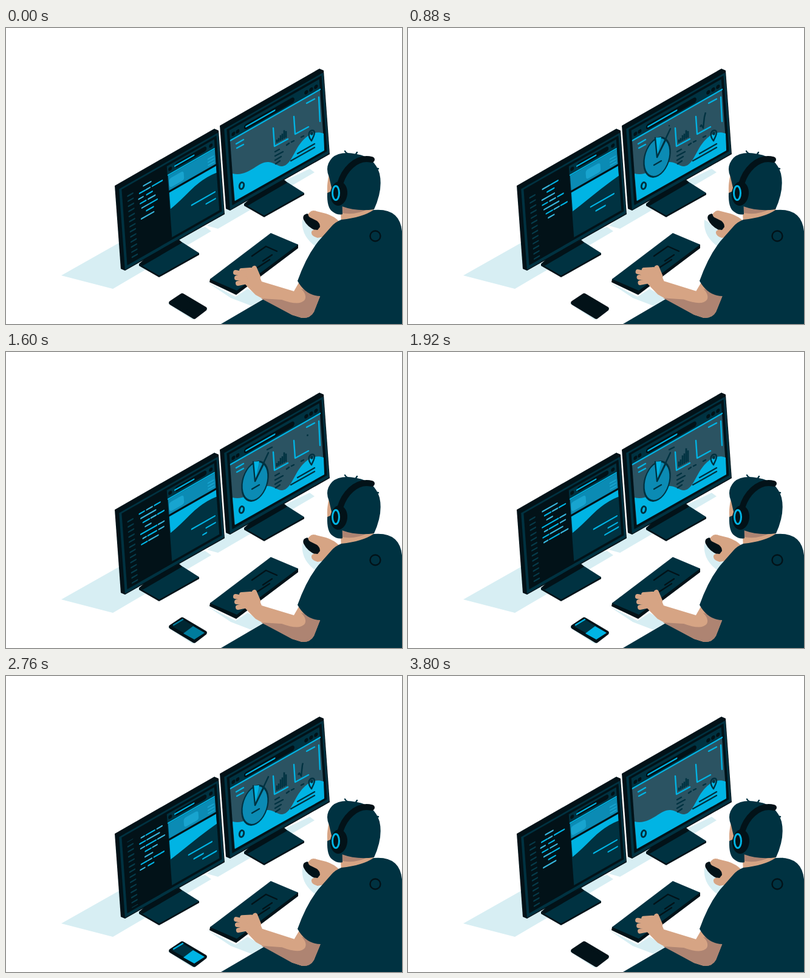
Animation, 652 px wide and 488 px high, one loop 3.84 s. Source, as an HTML page:

```html
<!DOCTYPE html>
<html lang="en">
<head>
<meta charset="utf-8">
<title>Developer at work</title>
<style>
  html, body { margin: 0; width: 100%; height: 100%; overflow: hidden; background: #fff; }
  svg { display: block; width: 652px; height: 488px; }
  .navy { fill: #003241; }
  .black { fill: #021218; }
  .blue { fill: #00b4e4; }
  .shade { fill: #d7eef3; }
  .skin { fill: #d6a484; }
  .tan { fill: #ae8472; }
  .ln { fill: none; stroke-width: 2.4; stroke-linecap: round; stroke-linejoin: round; }
  .sBlue { stroke: #00b4e4; }
  .sNavy { stroke: #003241; }
  .sBlack { stroke: #021218; }
</style>
</head>
<body>
<svg viewBox="0 0 652 488">
  <defs>
    <clipPath id="banner"><path d="M80 26H157V127H80Z"/></clipPath>
    <clipPath id="codeArea"><path d="M28 18H77V76H28Z"/></clipPath>
    <clipPath id="gutter"><path d="M9 18H28V127H9Z"/></clipPath>
    <g id="monitor">
      <path class="black" d="M-6-3 158-97 165-94 175 44 11 137 4 134Z"/>
      <g transform="matrix(1 -.57 .073 1 0 0)">
        <path class="navy" d="M1 3H164V136H1Z"/>
        <path class="black" d="M5 6H161V131H5Z"/>
      </g>
    </g>
    <g id="stand">
      <path class="black" d="M0 0V3L33 22 99 -15V-18Z"/>
      <path class="navy" d="M0 0 66-39 99-18 33 19Z"/>
      <path class="black" d="M0 0 12-11 66-40 71-35 6 3Z"/>
    </g>
  </defs>

  <!-- desk shadows -->
  <path class="shade" d="M91 408 190 352 328 328 338 335 176 430Z
    M331 326 362 299 500 232 508 238 349 331Z
    M331 419 378 443 398 430 425 446 404 458 370 445Z
    M488 316Q485 343 511 361L525 340Z M267 455 307 481 312 478 275 450Z"/>

  <use href="#stand" x="219" y="389"/>
  <use href="#stand" x="392" y="290"/>

  <!-- left monitor -->
  <use href="#monitor" x="185" y="263"/>
  <g transform="matrix(1 -.57 .073 1 185 263)">
    <path id="numbers" class="ln" stroke="#063c4b" clip-path="url(#gutter)"/>
    <g clip-path="url(#codeArea)">
      <path id="codeA" class="ln" stroke="#38b5db"/>
      <path id="codeB" class="ln sBlue"/>
    </g>
    <path class="navy" d="M79 10H157V127H79Z"/>
    <path class="ln sBlack" style="stroke-width:8" d="M96 17H140"/>
    <path class="ln sBlue" d="M92 17H123"/>
    <g class="black"><circle cx="84" cy="17" r="3"/><circle cx="151" cy="17" r="3"/></g>
    <g clip-path="url(#banner)">
      <path fill="#0b8bb4" d="M79 26H157V51H79Z"/>
      <rect id="pill" fill="#18a4cf" y="32" width="24" height="15" rx="4"/>
      <path class="ln" stroke="#18a4cf" style="stroke-width:2" d="M145 36H154M145 41H154M145 46H154"/>
      <path id="hill" class="blue"/>
      <path id="captions" class="ln sBlue"/>
    </g>
    <path class="ln sBlack" style="stroke-width:3" d="M79 52H157"/>
    <path class="ln sBlue" style="stroke-width:2" d="M80 25H156"/>
  </g>

  <!-- right monitor -->
  <use href="#monitor" x="358" y="164"/>
  <g transform="matrix(1 -.57 .073 1 358 164)">
    <path class="navy" d="M9 10H157V27H9Z"/>
    <path fill="#2b5362" d="M9 27H157V126H9Z"/>
    <path class="ln sBlack" style="stroke-width:9" d="M37 19H111"/>
    <path class="ln sBlue" d="M36 19H83"/>
    <path class="ln sBlue" d="M10 27H157"/>
    <g class="black">
      <circle cx="15" cy="19" r="3"/><circle cx="22" cy="19" r="3"/>
      <circle cx="135" cy="19" r="3.2"/><circle cx="143" cy="19" r="3.2"/><circle cx="151" cy="19" r="3.2"/>
    </g>
  </g>
  <path class="blue" d="M373 240C400 246 414 220 432 221 443 222 448 229 455 228 470 226 474 200 490 184 502 172 513 170 523 174L524 202 377 285Z"/>
  <path class="ln sBlue" d="M379 191 391 184M380 198 391 192M495 124 508 117M515 114 517 154M440 165 442 195 464 183M474 146 476 175 498 163"/>
  <path class="ln sNavy" d="M443 204 450 200M443 211 456 204M443 218 453 212M444 224 451 219M462 193 466 190M470 188 474 186M486 180 490 178M469 219 508 197M480 207 508 191"/>
  <path class="ln sNavy" d="M503 186C499 181 498 177 499 173 501 168 507 167 508 172 508 177 505 181 503 186Z"/>
  <ellipse class="ln sNavy" cx="503.500" cy="174" rx="1" ry="1.500"/>
  <ellipse class="ln sNavy" style="stroke-width:3" cx="388" cy="260" rx="3.500" ry="5.500" transform="rotate(14 388 260)"/>
  <path id="bars" class="ln sNavy" style="stroke-width:2.600;stroke-linecap:butt"/>
  <path id="trend" class="ln sNavy" pathLength="100" style="stroke-linecap:butt" d="M481 163 483 160 486 165 488 147 490 139 493 146 497 136"/>
  <g id="pie">
    <ellipse fill="#0b8bb4" class="sNavy" stroke-width="2.400" rx="21.500" ry="30" transform="matrix(1 -.57 .073 1 0 0)"/>
    <path class="blue" d="M0 0-3-32 7-33Z"/>
    <path class="ln sNavy" d="M-3-32 0 0 15-30M-5 13 7 6"/>
  </g>
  <path id="pointer" class="ln sNavy"/>
  <path id="label" class="ln sNavy"/>

  <!-- keyboard and phone -->
  <path class="black" d="M336 414 335 419 379 440 481 363V357L436 350Z"/>
  <path class="navy" d="M336 414 436 338 481 357 380 433Z"/>
  <path class="ln sBlack" d="M405 376 428 360 446 368M423 384 438 374M414 395 434 382"/>
  <path class="black sBlack" stroke-width="7.500" stroke-linejoin="round" d="M272 453 290 441 327 463 310 476Z"/>
  <g id="phone">
    <path class="navy" d="M273 452 291 441 327 463 310 473Z"/>
    <path class="blue" d="M292 464 308 452 327 463 310 474Z"/>
    <path class="ln sBlue" d="M276 450 291 441"/>
  </g>

  <!-- mouse hand -->
  <g id="mouse">
    <path class="black" d="M490 316Q487 308 496 306L518 320Q522 333 510 334 496 328 490 316Z"/>
    <path class="skin" d="M500 304Q504 299 511 302L527 306Q540 310 550 320L535 342 513 346Q502 343 503 336 505 331 513 333L517 328Q517 322 512 318L500 312Q495 307 500 304Z"/>
  </g>

  <!-- body -->
  <path class="navy" d="M354 488 424 447 520 440 652 440V488Z"/>
  <path class="skin" d="M550 288H607L604 306 552 322Z"/>
  <path class="tan" d="M553 294 595 299Q575 309 553 305Z"/>
  <g id="arm">
    <path class="skin" d="M388 399 405 395 418 411 421 418 474 434 482 420 518 440 507 468Q501 479 487 478L471 473 411 440 398 427 389 417Z"/>
    <path class="ln" stroke="#d6a484" style="stroke-width:8" d="M378 403 392 406M388 400 402 399M380 412 394 413M382 421 396 418M409 396 415 410"/>
    <path class="tan" d="M454 448Q484 459 492 448 496 440 486 430L518 440 507 468Q501 479 487 478L471 473 420 446Z"/>
  </g>
  <path class="navy" d="M552 316Q588 312 605 300 648 296 652 335V488H505L518 442Q494 442 480 417 497 369 521 344L536 327Q542 320 552 316Z"/>
  <circle class="ln sBlack" cx="608" cy="343" r="8.500"/>

  <!-- head -->
  <g id="head">
    <path class="skin" d="M532 241Q527 260 530 280L550 295 565 245Z"/>
    <path class="navy" d="M529 272Q528 297 538 303 546 309 554 307L553 268 538 268Z"/>
    <path class="navy" d="M532 246Q524 228 537 214 550 202 578 208 607 213 615 240 621 266 606 299 578 303 553 294L538 272Z"/>
    <path class="ln sNavy" d="M558 203Q561 208 567 208M578 205 574 211M606 231 613 232"/>
    <path class="ln sBlack" style="stroke-width:10" d="M549 261C555 235 576 211 602 217"/>
    <ellipse class="black" cx="548" cy="273" rx="14" ry="20" transform="rotate(6 548 273)"/>
    <ellipse class="ln sBlue" style="stroke-width:3" cx="543" cy="272" rx="5.500" ry="11.500"/>
  </g>
</svg>

<script>
const LOOP = 3840, ROW = 8.4;
// tokens of each code row: start, length, ...
const rows = [
  [40, 12], [33, 9, 44, 6, 54, 16], [31, 7, 44, 9], [33, 9, 46, 11],
  [35, 11, 48, 12], [42, 11], [33, 20], [33, 8, 45, 9, 58, 9],
  [35, 24], [38, 10, 51, 8, 62, 10], [41, 9], [33, 26, 62, 9],
  [36, 5, 44, 14, 62, 8], [33, 9, 45, 20], [34, 6, 43, 16, 62, 11], [41, 9, 53, 7]
];
const barHeights = [5, 6, 9, 10, 14, 11];

const $ = id => document.getElementById(id);
const draw = (id, d) => $(id).setAttribute('d', d);
const move = (id, value) => $(id).setAttribute('transform', value);
const clamp = x => Math.min(1, Math.max(0, x));
const linear = (t, a, b) => clamp((t - a) / (b - a));
const ease = (t, a, b) => { const x = linear(t, a, b); return x * x * (3 - 2 * x); };
const bump = (t, a, b) => Math.sin(Math.PI * linear(t, a, b)) ** 2;
const mix = (a, b, k) => a + (b - a) * k;

function drawCode(t) {
  const scroll = t / LOOP * rows.length, first = Math.floor(scroll), part = scroll - first;
  const paths = ['', ''];
  for (let k = 0; k < 8; k++) {
    const n = (first + k) % rows.length, tokens = rows[n];
    const y = 20 + (k - part) * ROW;
    const typed = k < 7 ? 99 : 30 + part * 45;
    for (let i = 0; i < tokens.length; i += 2) {
      const end = Math.min(tokens[i] + tokens[i + 1], typed);
      if (end > tokens[i]) paths[(n + i / 2) % 2] += `M${tokens[i]} ${y}H${end}`;
    }
  }
  draw('codeA', paths[0]);
  draw('codeB', paths[1]);
  let numbers = '';
  for (let k = 0; k < 14; k++) numbers += `M14 ${22 + (k - part) * ROW}h8`;
  draw('numbers', numbers);
}

function drawPage(t, h) {
  const k = ease(h, 420, 720) - ease(h, 1300, 1480);
  $('pill').setAttribute('x', mix(81, 105, k));
  draw('hill', `M79 54H157V${mix(65, 70, k)}Q${mix(134, 134, k)} ${mix(61, 73, k)} 112 ${mix(70, 78, k)}T79 ${mix(81, 85, k)}Z`);
  const a = mix(114, 109, k), b = mix(137, 117, k);
  const extra = 22 * (ease(t, 1500, 1800) - ease(t, 3000, 3300));
  draw('captions', `M${a} 94h38M${b} 105h15` + (extra > 0 ? `M131 113h${extra}` : ''));
}

function drawCharts(t, h) {
  const size = ease(t, 120, 520) - ease(t, 3200, 3640);
  move('pie', `translate(410 213) scale(${size})`);
  const reach = ease(t, 480, 840) - ease(t, 2900, 3240);
  draw('pointer', reach > 0 ? `M410 213l${22 * reach} ${-47 * reach}` : '');
  const tag = ease(t, 860, 1120) - ease(t, 2400, 2700);
  draw('label', tag > 0 ? `M430 161l${8 * tag} ${-4 * tag}` : '');

  const head = 100 * linear(h, 560, 1050), tail = 100 * linear(h, 900, 1640);
  $('trend').style.visibility = head > tail ? 'visible' : 'hidden';
  $('trend').setAttribute('stroke-dasharray', `0 ${tail} ${head - tail} 200`);

  const grown = 1 + .7 * (ease(t, 1450, 1850) - ease(t, 2800, 3200));
  draw('bars', barHeights.map((height, i) =>
    `M${446 + i * 3} ${189 - i * 1.6}v${-height * grown}`).join(''));
}

function render(t) {
  const half = t % (LOOP / 2);
  drawCode(t);
  drawPage(t, half);
  drawCharts(t, half);
  $('phone').style.opacity = ease(t, 1450, 1700) - ease(t, 3480, 3720);
  const nudge = bump(t, 520, 1240);
  move('mouse', `translate(${4 * nudge} 0)`);
  move('head', `translate(${-nudge} 0)`);
  move('arm', `rotate(${1.1 * Math.sin(Math.PI * t / 320) ** 2} 495 470)`);
}

const begin = performance.now();
function tick() {
  render((performance.now() - begin) % LOOP);
  requestAnimationFrame(tick);
}
tick();
</script>
</body>
</html>
```
